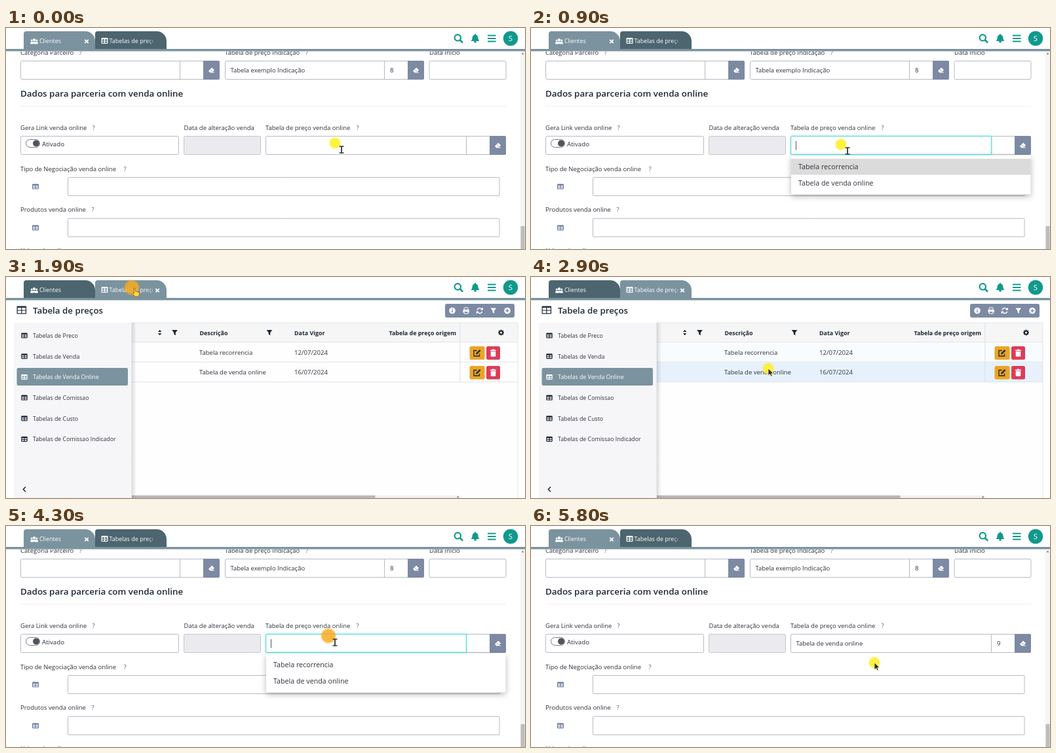
An HTML page with a canvas that plays this animation: 792x338 px, repeating every 5900 ms.

```html
<!DOCTYPE html>
<html lang="pt">
<head>
<meta charset="utf-8">
<style>
html, body { margin: 0; width: 100%; height: 100%; overflow: hidden; background: #fff; }
canvas { display: block; width: 792px; height: 338px; }
</style>
</head>
<body>
<canvas id="stage"></canvas>
<script>
const W = 792, H = 338, LOOP = 5900, STEP = 100;
const FONT = '"Open Sans", "Noto Sans", sans-serif';
const INK = '#2d323b', DARK = '#1d2733', TEAL = '#11998c', SLATE = '#7b939e', DEEP = '#4c656f';
const BLUE = '#7d8aa4', LINE = '#b7bac3';

const cv = document.getElementById('stage');
const c = cv.getContext('2d');
const dpr = window.devicePixelRatio || 1;
cv.width = W * dpr;
cv.height = H * dpr;

// pointer path: time, x, y
const PATH = [
  [0, 502, 176], [300, 500, 176], [600, 488, 178], [900, 473, 178],
  [1100, 470, 224], [1300, 455, 200], [1700, 194, 18], [1900, 192, 16],
  [2400, 197, 26], [2900, 362, 140], [3600, 362, 140], [3700, 204, 48],
  [3900, 84, 18], [4000, 84, 18], [4300, 492, 168], [4400, 490, 178],
  [4600, 484, 229], [4700, 484, 229], [4800, 518, 210], [4900, 524, 209], [LOOP, 524, 209]
];
const CLICKS = [[300, 500], [1800, 2100], [3100, 3300], [3900, 4100], [4300, 4400], [4700, 4800]];
const within = (t, a, b) => t >= a && t < b;

function pointer(t) {
  let i = 1;
  while (t > PATH[i][0]) i++;
  const [t0, x0, y0] = PATH[i - 1], [t1, x1, y1] = PATH[i];
  const k = (t - t0) / (t1 - t0), e = k * k * (3 - 2 * k);
  return { x: x0 + (x1 - x0) * e, y: y0 + (y1 - y0) * e };
}

function text(s, x, y, size = 9.5, color = INK, weight = 400, align = 'left') {
  c.font = `${weight} ${size}px ${FONT}`;
  c.fillStyle = color;
  c.textAlign = align;
  c.fillText(s, x, y);
}

function rect(x, y, w, h, color) {
  c.fillStyle = color;
  c.fillRect(x, y, w, h);
}

function panel(x, y, w, h, r, fill, stroke) {
  c.beginPath();
  c.roundRect(x, y, w, h, r);
  if (fill) { c.fillStyle = fill; c.fill(); }
  if (stroke) { c.strokeStyle = stroke; c.lineWidth = 1; c.stroke(); }
}

function poly(pts, fill) {
  c.beginPath();
  pts.forEach(([x, y]) => c.lineTo(x, y));
  c.closePath();
  c.fillStyle = fill;
  c.fill();
}

function line(pts, color, width = 1) {
  c.beginPath();
  pts.forEach(([x, y]) => c.lineTo(x, y));
  c.strokeStyle = color;
  c.lineWidth = width;
  c.stroke();
}

function disc(x, y, r, fill) {
  c.beginPath();
  c.arc(x, y, r, 0, 7);
  c.fillStyle = fill;
  c.fill();
}

function ring(x, y, r, color, width, a = 0, b = 7) {
  c.beginPath();
  c.arc(x, y, r, a, b);
  c.strokeStyle = color;
  c.lineWidth = width;
  c.stroke();
}

// icons, all centred on x, y
function grid(x, y, w, h, color, hole) {
  panel(x - w / 2, y - h / 2, w, h, 1.2, color);
  const cw = (w - 3.6) / 2, ch = (h - 4.6) / 2;
  for (const sx of [-1, 1]) for (const sy of [0, 1])
    rect(x + (sx < 0 ? -cw - 0.6 : 0.6), y - h / 2 + 2.4 + sy * (ch + 1), cw, ch, hole);
}

function people(x, y) {
  for (const [dx, dy, r] of [[-3.8, -1, 1.5], [3.8, -1, 1.5], [0, -1.8, 2.1]]) {
    disc(x + dx, y + dy, r, '#fff');
    panel(x + dx - r * 1.35, y + dy + r + 0.6, r * 2.7, 3.3, [1.6, 1.6, 0.4, 0.4], '#fff');
  }
}

function cross(x, y) {
  line([[x - 2.7, y - 2.7], [x + 2.7, y + 2.7]], '#fff', 1.8);
  line([[x - 2.7, y + 2.7], [x + 2.7, y - 2.7]], '#fff', 1.8);
}

function eraser(x, y) {
  poly([[x - 4.5, y + 1.2], [x + 0.6, y - 4], [x + 4.5, y - 0.2], [x + 1, y + 3.6], [x - 2.4, y + 3.6]], '#fff');
  line([[x - 1.6, y - 0.8], [x + 1.8, y + 2.4]], BLUE, 0.8);
  rect(x - 2, y + 2.9, 6.4, 1, '#fff');
}

function funnel(x, y, color) {
  poly([[x - 4.4, y - 4], [x + 4.4, y - 4], [x + 1.3, y], [x + 1.3, y + 4.2], [x - 1.3, y + 2.5], [x - 1.3, y]], color);
}

function gear(x, y) {
  ring(x, y, 2.6, DARK, 2);
  for (let i = 0; i < 8; i++) {
    const a = i * Math.PI / 4;
    line([[x + 3 * Math.cos(a), y + 3 * Math.sin(a)], [x + 4.5 * Math.cos(a), y + 4.5 * Math.sin(a)]], DARK, 1.6);
  }
}

function tab(x, on) {
  panel(x, 5, 109, 29, [4, 15, 0, 0], on ? SLATE : DEEP);
}

function header(form) {
  rect(0, 0, W, 36, '#fff');
  tab(136, !form);
  tab(27, form);
  rect(0, 32, W, 3.5, SLATE);
  people(43, 20);
  text('Clientes', 51, 23, 8.9, '#fff');
  grid(150.5, 19.5, 10, 9, '#fff', form ? DEEP : SLATE);
  c.save();
  c.beginPath();
  c.rect(150, 5, 74.5, 27);
  c.clip();
  const fade = c.createLinearGradient(214, 0, 226, 0);
  fade.addColorStop(0, '#fff');
  fade.addColorStop(1, 'rgba(255,255,255,.35)');
  text('Tabelas de preços', 157.5, 23, 9, fade);
  c.restore();
  cross(form ? 123 : 231, 20.5);

  ring(689.3, 14.8, 4.7, TEAL, 2.2);
  line([[692.6, 18], [697, 22.6]], TEAL, 2.6);
  c.beginPath();
  c.moveTo(709.5, 20);
  c.quadraticCurveTo(711.5, 18, 711.6, 15);
  c.bezierCurveTo(711.6, 8.5, 720.4, 8.5, 720.4, 15);
  c.quadraticCurveTo(720.5, 18, 722.5, 20);
  c.closePath();
  c.fillStyle = TEAL;
  c.fill();
  rect(715.2, 9, 1.6, 2, TEAL);
  disc(716, 21, 1.8, TEAL);
  for (const y of [10.5, 15, 19.5]) rect(735, y, 12.5, 2, TEAL);
  disc(770, 16, 11.2, TEAL);
  text('S', 770, 20.2, 11.5, '#fff', 400, 'center');
}

function label(s, x, y, help) {
  text(s, x, y);
  if (help) text('?', help, y, 9.5, '#59607a');
}

function lookup(x, y, w, value, code) {
  const cut = x + w - 60.5, btn = x + w - 25;
  panel(x + 0.5, y + 0.5, w - 1, 28, 2, '#fff', LINE);
  line([[cut, y + 1], [cut, y + 28]], LINE);
  panel(btn, y, 25, 29, [0, 2, 2, 0], BLUE);
  eraser(x + w - 12.5, y + 14.5);
  text(value, x + 8.5, y + 18.3);
  text(code, cut + 8.5, y + 18.3);
}

function dropdown(hot) {
  c.save();
  c.shadowColor = 'rgba(0,0,0,.28)';
  c.shadowBlur = 9 * dpr;
  c.shadowOffsetY = 3 * dpr;
  panel(397, 195, 365.5, 59.5, 2, '#fff');
  c.restore();
  if (hot >= 0) rect(397, 200 + hot * 24.5, 365.5, 24.5, '#dbdbdb');
  text('Tabela recorrencia', 408, 216.4, 10.7);
  text('Tabela de venda online', 408, 240.8, 10.7);
}

function form(t, p) {
  label('Categoria Parceiro', 22, 41, 111.5);
  label('Tabela de preço Indicação', 334, 41, 457);
  label('Data Início', 646, 41);
  lookup(22, 50, 304, '', '');
  lookup(334, 50, 304, 'Tabela exemplo Indicação', '8');
  panel(646, 50.5, 117, 28, 2, '#fff', LINE);
  text('Dados para parceria com venda online', 22, 104.6, 13.4, DARK, 600);
  rect(22, 119, 741, 1, '#efeff1');

  label('Gera Link venda online', 22, 155.6, 131.5);
  label('Data de alteração venda', 271.5, 155.6);
  label('Tabela de preço venda online', 396, 155.6, 534.5);
  panel(22.5, 165.5, 241, 28, 2, '#fff', LINE);
  panel(30.5, 170.5, 21, 12, 6, '#fff', '#777a83');
  disc(46, 176.5, 5, '#51545e');
  text('Ativado', 55, 180.6, 9.7);
  panel(271.5, 165.5, 117, 28, 2, '#eaeaef', '#c3c5ce');

  const done = t >= 4900;
  lookup(396, 165, 367, done ? 'Tabela de venda online' : '', done ? '9' : '');

  const rows = [['Tipo de Negociação venda online', 218.6, 179.5], ['Produtos venda online', 281.4, 130.5]];
  for (const [s, y, q] of rows) {
    label(s, 22, y, q);
    panel(94.5, y + 9.9, 658.5, 28, 1, '#fff', LINE);
    grid(45, y + 24, 10, 8, '#6c7d9f', '#fff');
  }
  label('Url venda online', 22, 344);

  rect(784.5, 36, 7.5, H, '#f5f5f5');
  poly([[786.5, 40.2], [790.5, 40.2], [788.5, 37.8]], '#777');
  rect(785.5, 303, 6, 35, '#bdbdbd');

  const first = within(t, 500, 1700), open = first || within(t, 4300, 4800);
  if (!open) return false;
  c.save();
  c.shadowColor = 'rgba(70,220,215,.6)';
  c.shadowBlur = 3 * dpr;
  panel(396.5, 165.5, 306, 28, [2, 0, 0, 2], '#fff', '#5fdedb');
  c.restore();
  rect(404, 173, 1, 13.5, '#555');
  const over = p.y < 198 ? -1 : p.y < 222 ? 0 : 1;
  dropdown(first ? Math.max(over, 0) : over);
  return true;
}

function toolbar() {
  panel(670, 41, 106, 21, 3, BLUE);
  disc(681, 51.5, 4.8, '#fff');
  rect(680.3, 50.8, 1.5, 3.6, BLUE);
  rect(680.3, 48.4, 1.5, 1.4, BLUE);
  panel(697.4, 50, 9.4, 4.6, 1, '#fff');
  panel(699.2, 46.9, 5.8, 3.4, 0.6, null, '#fff');
  panel(699.2, 52.6, 5.8, 3.4, 0, BLUE, '#fff');
  ring(722.8, 51.5, 4, '#fff', 1.5, 3.4, 5.9);
  ring(722.8, 51.5, 4, '#fff', 1.5, 0.3, 2.8);
  poly([[728, 46.6], [728, 50.6], [724, 50.6]], '#fff');
  poly([[717.6, 56.4], [717.6, 52.4], [721.6, 52.4]], '#fff');
  funnel(743.8, 51.5, '#fff');
  disc(765, 51.5, 4.8, '#fff');
  rect(764.3, 48.8, 1.5, 5.4, BLUE);
  rect(762.3, 50.8, 5.4, 1.5, BLUE);
}

function actions(y) {
  panel(707.5, y, 23, 20.5, 2.5, '#eaa526');
  line([[718.5, y + 6.5], [714, y + 6.5], [714, y + 15], [722.5, y + 15], [722.5, y + 11.5]], DARK, 1.3);
  line([[717.6, y + 11.8], [723.6, y + 5.8]], DARK, 2.4);
  panel(733, y, 21, 20.5, 2.5, '#dc3c57');
  rect(739, y + 5.6, 9, 1.4, '#fff');
  rect(741.8, y + 4.6, 3.4, 1.4, '#fff');
  panel(739.7, y + 7.7, 7.6, 8, [0, 0, 1, 1], '#fff');
}

function tableView(t, p) {
  grid(23.8, 50.5, 14.5, 12, DARK, '#fff');
  text('Tabela de preços', 41, 55.6, 13.3, DARK, 600);
  toolbar();

  rect(192, 70, 589, 268, '#fefefe');
  rect(192, 70, 589, 29, '#f6f6f7');
  const hover = p.y > 126 && p.y < 160;
  if (t >= 2600) rect(192, 99, 589, 30.5, '#f9fcfe');
  if (hover) rect(192, 130, 589, 30, '#e6f1fc');
  else if (t >= 3200) rect(192, 130, 589, 30, '#f6fafd');
  for (const y of [69.5, 99, 129.5, 160]) rect(192, y, 589, 1, '#e4e5ea');
  rect(692.5, 70, 1, 90, '#dcdde3');
  rect(780.5, 70, 1, 268, '#e2e3e8');

  poly([[232, 84], [237.4, 84], [234.7, 80.8]], DARK);
  poly([[232, 86], [237.4, 86], [234.7, 89.2]], DARK);
  funnel(257.5, 85, DARK);
  funnel(402, 85, DARK);
  gear(755.5, 85);
  text('Descrição', 295.5, 88.6, 8.9, DARK, 700);
  text('Data Vigor', 440, 88.6, 8.9, DARK, 700);
  text('Tabela de preço origem', 584.5, 88.6, 8.9, DARK, 700);
  text('Tabela recorrencia', 295, 118.7);
  text('12/07/2024', 440, 118.7, 9.6);
  text('Tabela de venda online', 295, 149.2);
  text('16/07/2024', 440, 149.2, 9.6);
  actions(106);
  actions(136);
  if (t >= 3200) panel(282.5, 130, 144, 29.5, 0, null, '#78b9e2');

  rect(192, 334, 501, 4, '#f1f1f1');
  rect(192, 334, 371.5, 4, '#b9b9b9');
  poly([[690.5, 335], [690.5, 338], [688, 336.5]], '#666');

  const shade = c.createLinearGradient(191, 0, 199, 0);
  shade.addColorStop(0, 'rgba(60,60,75,.2)');
  shade.addColorStop(1, 'rgba(60,60,75,0)');
  rect(191, 70, 8, 268, shade);
  rect(12, 70, 179.5, 268, '#f6f6f9');
  const items = ['Preco', 'Venda', 'Venda Online', 'Comissao', 'Custo', 'Comissao Indicador'];
  items.forEach((s, i) => {
    const y = 89.5 + i * 31.7, on = i === 2;
    if (on) panel(16.5, 139, 169.5, 27, 2.5, SLATE);
    grid(28, y, 9.5, 8, on ? '#fff' : DARK, on ? SLATE : '#f6f6f9');
    text('Tabelas de ' + s, 41, y + 3.3, 8.8, on ? '#fff' : INK);
  });
  line([[30, 321], [26.3, 324.8], [30, 328.6]], DARK, 1.5);
}

function outline(pts, x, y, fill, edge) {
  c.save();
  c.translate(x, y);
  c.lineJoin = 'round';
  poly(pts, fill);
  c.strokeStyle = edge;
  c.lineWidth = 0.8;
  c.stroke();
  c.restore();
}

function drawPointer(t, p, isForm, open) {
  const press = CLICKS.some(([a, b]) => within(t, a, b));
  const r = press ? 12 : 9.2;
  const glow = c.createRadialGradient(p.x, p.y, r * 0.75, p.x, p.y, r);
  const rgb = press ? '247,172,32' : '255,240,30';
  glow.addColorStop(0, `rgba(${rgb},.86)`);
  glow.addColorStop(1, `rgba(${rgb},.25)`);
  disc(p.x, p.y, r, glow);

  const inField = isForm && p.x > 390 && p.y > 155 && p.y < 192;
  const hand = p.y < 32 || (open && p.y >= 198);
  if (inField) {
    const x = p.x + 10, y = p.y + 10;
    line([[x, y - 5], [x, y + 5]], '#333', 1.8);
    for (const s of [-5, 5]) line([[x - 3.5, y + s], [x + 3.5, y + s]], '#333', 1.5);
  } else if (hand) {
    outline([[2, 0], [4, 0], [4.6, 5], [9.5, 6], [10.5, 8], [9.5, 13], [4, 13], [0, 8.5], [1, 7], [2.6, 8]],
      p.x + 1, p.y + 1, '#ffd64a', '#8a6412');
  } else {
    outline([[0, 0], [0, 10.8], [2.6, 8.5], [4.4, 12.2], [6.3, 11.3], [4.6, 7.8], [8, 7.5]], p.x, p.y, '#2b2a22', '#fff7b0');
  }
}

function draw(t) {
  const p = pointer(t), isForm = !within(t, 1900, 4000);
  let open = false;
  c.setTransform(dpr, 0, 0, dpr, 0, 0);
  rect(0, 0, W, H, '#fff');
  if (isForm) open = form(t, p);
  else tableView(t, p);
  header(isForm);
  drawPointer(t, p, isForm, open);
}

function tick(now) {
  draw(Math.floor((now % LOOP) / STEP) * STEP);
  requestAnimationFrame(tick);
}
requestAnimationFrame(tick);
</script>
</body>
</html>
```
